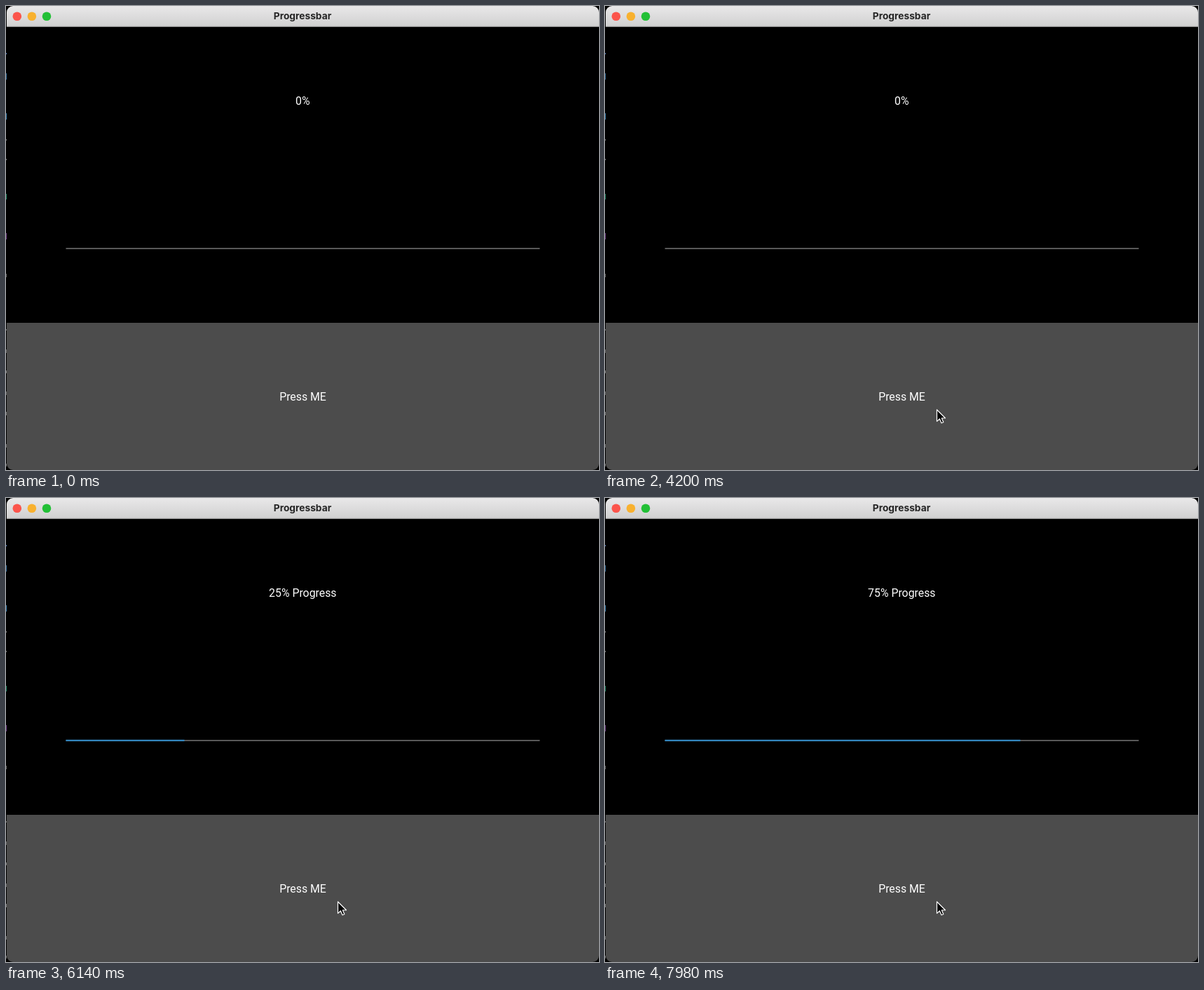
Write an HTML page that moves like this. It is 846 by 662 pixels and loops after 8 s.

```html
<!DOCTYPE html>
<html lang="en">
<head>
<meta charset="utf-8">
<title>Progressbar</title>
<style>
  html, body { margin: 0; width: 100%; height: 100%; overflow: hidden; background: #000; }
  svg { display: block; width: 100vw; height: 100vh; }
  text { text-anchor: middle; }
  .label { font: 15.84px Roboto, sans-serif; fill: #fff; }
  .title { font: 700 13.75px Inter, sans-serif; fill: #262626; }
</style>
</head>
<body>
<svg viewBox="0 0 846 662">
  <defs>
    <linearGradient id="chrome" x2="0" y2="1">
      <stop offset="0" stop-color="#e9e8e9"/>
      <stop offset="1" stop-color="#d0d0d0"/>
    </linearGradient>
    <clipPath id="frame"><rect x="1" width="845" height="662" rx="9"/></clipPath>
  </defs>
  <rect width="846" height="662"/>
  <g id="specks"></g>
  <g clip-path="url(#frame)">
    <rect x="1" width="845" height="662"/>
    <rect x="1" width="845" height="29.5" fill="url(#chrome)"/>
    <rect x="1" y="28.5" width="845" height="1" fill="#b9b9b9"/>
    <rect id="button" x="1" y="452" width="845" height="210"/>
  </g>
  <circle cx="15.8" cy="14.8" r="6.3" fill="#fb544b"/>
  <circle cx="36.9" cy="14.8" r="6.3" fill="#f8b12f"/>
  <circle cx="58" cy="14.8" r="6.3" fill="#22c036"/>
  <text class="title" x="423" y="19">Progressbar</text>
  <text class="label" id="status" x="423.3" y="140.6"></text>
  <rect x="85.5" y="345.4" width="676" height="1.2" fill="#929292"/>
  <rect id="bar" x="85.5" y="344.8" height="2.3" fill="#3385bd"/>
  <text class="label" x="423.5" y="563">Press ME</text>
  <path id="cursor" d="M0 0V16.6L3.9 13L6.5 19L9.3 17.8L6.8 12H12Z"
        fill="#000" stroke="#fff" stroke-width="1.2" stroke-linejoin="round"/>
</svg>
<script>
const LOOP = 8000;
const BAR_WIDTH = 676;
const clicks = [[4220, 4360], [6160, 6280], [7840, 7980]];
const $ = id => document.getElementById(id);

// Slivers of the window behind, visible along the left edge: y, height, colour
const specks = [
  [67, 2, "#5279b8"], [96, 9, "#366f9e"], [153, 9, "#3e83b5"], [190, 2, "#777"],
  [218, 2, "#777"], [268, 8, "#258a68"], [324, 9, "#75438c"], [382, 5, "#666"],
  [461, 2, "#666"], [490, 5, "#666"], [520, 4, "#777"], [550, 5, "#666"],
  [579, 5, "#777"], [625, 5, "#666"], [653, 4, "#666"]
];
$("specks").innerHTML = specks.map(([y, h, fill]) =>
  `<rect y="${y}" width="1" height="${h}" fill="${fill}"/>`).join("");

function ease(t, start, end) {
  const u = Math.min(1, Math.max(0, (t - start) / (end - start)));
  return u * u * (3 - 2 * u);
}

function draw(t) {
  const count = clicks.filter(([down]) => t >= down).length;
  const pressed = clicks.some(([down, up]) => t >= down && t < up);
  $("status").textContent = count ? `${count * 25}% Progress` : "0%";
  $("bar").setAttribute("width", BAR_WIDTH * count / 4);
  $("button").setAttribute("fill", pressed ? "#2f7fa8" : "#4c4c4c");

  const enter = ease(t, 2600, 2800);
  const x = 640 - 64 * enter - 102.5 * ease(t, 3400, 4040);
  const y = 663 - 87 * enter;
  $("cursor").setAttribute("transform", `translate(${x} ${y})`);
  $("cursor").setAttribute("visibility", t < 2600 ? "hidden" : "visible");
}

const begin = performance.now();
function tick() {
  draw((performance.now() - begin) % LOOP);
  requestAnimationFrame(tick);
}
tick();
</script>
</body>
</html>
```
